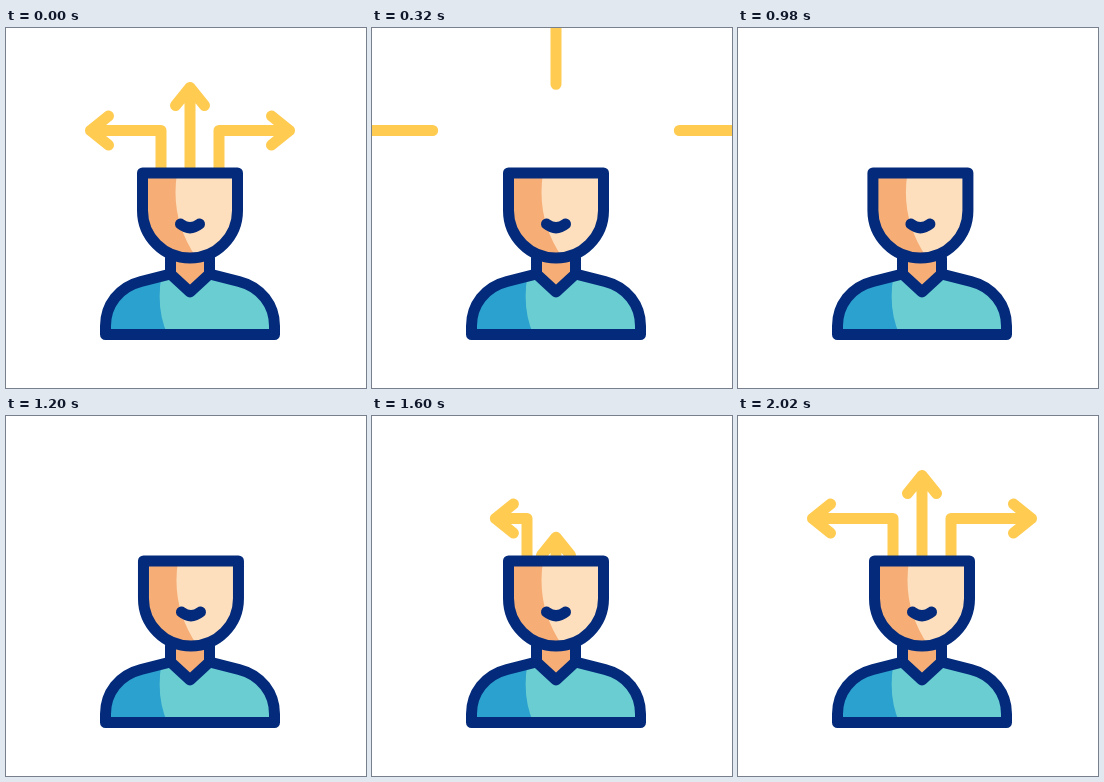
An HTML page that plays this animation: 360 by 360 pixels, repeating every 2.22 s.

```html
<!DOCTYPE html>
<html lang="en">
<head>
<meta charset="utf-8">
<title>Thinking in every direction</title>
<style>
html, body { margin: 0; width: 100%; height: 100%; overflow: hidden; background: #fff; }
svg { display: block; width: 100%; height: 100%; }
.line { fill: none; stroke: #042b7b; stroke-width: 11; stroke-linecap: round; stroke-linejoin: round; }
#arrows path { fill: none; stroke: #ffcb50; stroke-width: 11; stroke-linecap: round; stroke-linejoin: round; }
</style>
</head>
<body>
<svg viewBox="0 0 360 360">
  <defs>
    <path id="face" d="M136.5 145H231.5V182.5A47.5 47.5 0 0 1 136.5 182.5Z"/>
    <path id="shirt" d="M164.5 246L135 253.5C113 259 99.5 277 99.5 298V306.5H268.5V298C268.5 277 255 259 233 253.5L203.5 246L184 264Z"/>
    <clipPath id="faceClip"><use href="#face"/></clipPath>
    <clipPath id="shirtClip"><use href="#shirt"/></clipPath>
  </defs>
  <g id="arrows"><path/><path/><path/></g>
  <path d="M164.5 228H203.5V246L184 264L164.5 246Z" fill="#f6ae76"/>
  <use href="#shirt" fill="#69cdd2"/>
  <path d="M90 240H157Q148 280 163 310H90Z" fill="#2ba1cf" clip-path="url(#shirtClip)"/>
  <use href="#shirt" class="line"/>
  <path class="line" d="M164.5 230V246M203.5 230V246"/>
  <g id="head">
    <use href="#face" fill="#fddfbd"/>
    <path d="M130 140H172Q162 190 192 232H130Z" fill="#f6ae76" clip-path="url(#faceClip)"/>
    <use href="#face" class="line"/>
    <path class="line" d="M174.5 196Q184 203.5 193.5 196"/>
  </g>
</svg>
<script>
const LOOP = 2220, RISE = 42.5, BASE = 145;
const head = document.getElementById('head');
const paths = document.querySelectorAll('#arrows path');

// side: -1 left, 0 up, 1 right; lengths run along the route from inside the head
const arrows = [
  { side: -1, full: 123, length: 113, travel: 236, start: 1360 },
  { side: 0, full: 85.5, length: 85.5, travel: 153, start: 1490 },
  { side: 1, full: 123, length: 113, travel: 236, start: 1620 }
];
const GROW = 400, EXIT = 580, GONE = 560;
const clamp = v => Math.max(0, Math.min(1, v));
const smooth = p => p * p * (3 - 2 * p);

function pointAt(side, dist) {
  const x = 184 + 29 * side;
  return side && dist > RISE ? [x + side * (dist - RISE), BASE - RISE] : [x, BASE - dist];
}

function arrowPath(side, tail, tip) {
  const turned = side && tip > RISE;
  const [x, y] = pointAt(side, tip);
  const dx = turned ? side : 0, dy = turned ? 0 : -1;
  const wing = s => [x - 18 * dx - 14.5 * s * dy, y - 18 * dy + 14.5 * s * dx];
  const corner = turned && tail < RISE ? 'L' + pointAt(side, RISE) : '';
  return `M${pointAt(side, tail)}${corner}L${x},${y}M${wing(-1)}L${x},${y}L${wing(1)}`;
}

function draw(t) {
  arrows.forEach((a, i) => {
    let d = '';
    if (t < GONE) {
      const shift = a.travel * smooth(t / EXIT);
      d = arrowPath(a.side, shift, shift + a.length);
    } else if (t > a.start) {
      d = arrowPath(a.side, 0, a.full * clamp((t - a.start) / GROW));
    }
    paths[i].setAttribute('d', d);
  });
  const shake = -1.6 * Math.sin(clamp((t - 810) / 540) * 8 * Math.PI);
  head.setAttribute('transform', `translate(${shake} 0)`);
}

const begin = performance.now();
function tick() {
  draw((performance.now() - begin) % LOOP);
  requestAnimationFrame(tick);
}
tick();
</script>
</body>
</html>
```
